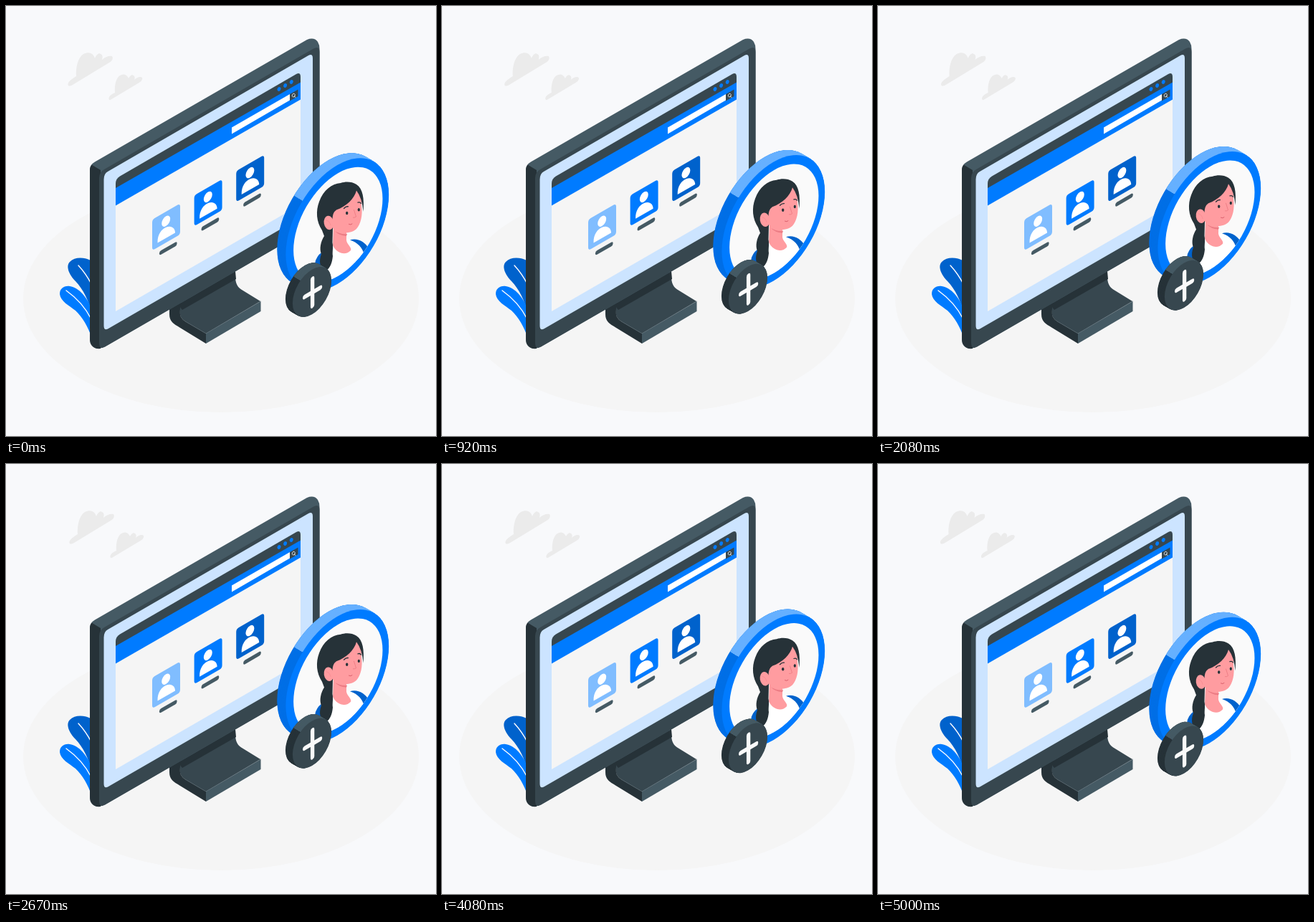
Animation of 600 by 600 pixels, one loop 5.08 s. Source, as an HTML page with a canvas:

```html
<!DOCTYPE html>
<html lang="en">
<head>
<meta charset="utf-8">
<title>Add a contact</title>
<style>
  html, body { margin: 0; width: 100%; height: 100%; overflow: hidden; background: #f8f9fb; }
  canvas { display: block; width: 600px; height: 600px; }
</style>
</head>
<body>
<canvas id="stage" width="600" height="600"></canvas>
<script>
const ctx = document.getElementById('stage').getContext('2d');

const BLUE = '#007bff', DEEP = '#0062cc', SKY = '#66b0ff', PALE = '#cce4ff';
const INK = '#263238', SLATE = '#37474f', STEEL = '#455a64';
const PAPER = '#f5f5f5', MILK = '#fafafa', SKIN = '#ff9ca0', BLUSH = '#ec7c84';

const LOOP = 5080, STEP = 1000 / 12, STEPS = 61;
const SWAY = [[0, 0], [920, .8], [1580, 1.4], [2670, 2], [3330, -3], [4080, 2], [5080, .4]];

function fill(d, color) {
  ctx.fillStyle = color;
  ctx.fill(new Path2D(d));
}

function stroke(d, color, width) {
  ctx.strokeStyle = color;
  ctx.lineWidth = width;
  ctx.lineCap = ctx.lineJoin = 'round';
  ctx.stroke(new Path2D(d));
}

function oval(x, y, rx, ry, color, turn = 0) {
  ctx.fillStyle = color;
  ctx.beginPath();
  ctx.ellipse(x, y, rx, ry, turn, 0, Math.PI * 2);
  ctx.fill();
}

function shifted(x, y, draw) {
  ctx.save();
  ctx.translate(x, y);
  draw();
  ctx.restore();
}

// Shapes lying in the isometric plane of the screen.
function isoPath(x, y, shape) {
  const path = new Path2D();
  path.addPath(shape, new DOMMatrix([.866, -.5, 0, 1, x, y]));
  return path;
}

function isoCircle(x, y, r) {
  const circle = new Path2D();
  circle.arc(0, 0, r, 0, Math.PI * 2);
  return isoPath(x, y, circle);
}

function isoRect(x, y, w, h, r, color) {
  const rect = new Path2D();
  rect.roundRect(-w / 2, -h / 2, w, h, r);
  ctx.fillStyle = color;
  ctx.fill(isoPath(x, y, rect));
}

// Thick disc: side wall, lit upper wall, then the front face.
function isoDisc(x, y, r, depth, split, side, lit, front) {
  const wall = color => {
    ctx.fillStyle = color;
    for (let d = depth; d > 0; d -= .5) ctx.fill(isoCircle(x - d * .866, y - d * .5, r));
  };
  wall(side);
  ctx.save();
  ctx.beginPath();
  const [sx, sy] = split;
  ctx.moveTo(sx - 9, sy - 5.2);
  ctx.lineTo(sx + 60, sy + 34.6);
  ctx.lineTo(600, sy + 34.6);
  ctx.lineTo(600, 100);
  ctx.lineTo(sx - 9, 100);
  ctx.clip();
  wall(lit);
  ctx.restore();
  ctx.fillStyle = front;
  ctx.fill(isoCircle(x, y, r));
}

function drawClouds() {
  fill('M86.5 110C86 106 90 103 98 98C97 87 100 72 108 67C116 63 122 66 124 73C126 68 130 65 132 67C135 68 135 71 134 75C138 71 144 69 148 70C150 73 148 77 144 79L93 110C89 112 87 112 86.5 110Z', '#ebebeb');
  fill('M143.5 130C143 126 147 123 152 121C151 110 154 99 160 96.5C166 94 169 97 171 101C173 97 176 95 178 97C180 98 180 101 179 103C183 99 188 98 190 100C191 103 188 106 184 108L149 129C146 131 144 132 143.5 130Z', '#ebebeb');
}

function drawPlant() {
  fill('M120 356C109 350 96 350 89 357C83 363 88 375 97 384C108 396 115 410 120 430Z', DEEP);
  stroke('M101 362Q112 374 119 388', '#fff', 1.4);
  fill('M120 464C114 446 107 435 97 425C88 418 76 412 75 402C75 394 81 390 89 391C102 393 113 406 120 424Z', BLUE);
  stroke('M84 397C98 407 111 421 119 437', '#fff', 1.4);
}

function drawStand() {
  fill('M243 414L320 366C319 384 321 391 329 396L355 412L279 457L250 440C242 435 241 428 243 414Z', SLATE);
  fill('M243 415L320 370L321 381L246 424Q242 421 243 415Z', INK);
  fill('M228 430V420L245 412C241 428 242 435 250 440L279 457V471L243 449C233 443 228 440 228 430Z', INK);
  fill('M279 457L355.5 412V426L279 471Z', STEEL);
  stroke('M250 440L279 457L355 412', '#52656e', .5);
}

function drawMonitor() {
  fill('M117 229Q117 221.5 124 217.5L420 47Q430 43 435 50Q437.5 54 437.5 60V302.5L138 475.5Q126 481 120 474Q117 471 117 464Z', STEEL);
  fill('M117 229Q117 224 119.5 221.5L132 229L132 478Q124 479 120 474Q117 471 117 464Z', INK);
  fill('M130 240Q130 232 137 228L429 59.5Q437.5 55 437.5 64V302.5L138 475.5Q130 480 130 470Z', SLATE);
  fill('M136.5 242Q136.5 234 142 231L422 69Q428 66 428 73V281Q428 285 422 289L143 450Q136.5 454 136.5 446Z', PALE);
}

function drawWindow() {
  fill('M153 250L411 102V277L153 426Z', PAPER);
  fill('M153 255V248Q153 241 159 237.5L405 95Q411 92 411 99V108Z', SLATE);
  fill('M153 254L411 106.5V130.5L153 278.5Z', BLUE);
  for (let i = 0; i < 3; i++) oval(381 + i * 8.6, 116 - i * 5, 2.3, 3, BLUE, .4);
  fill('M315 169.5L396 123V131.5L315 178.5Z', '#fff');
  fill('M396 123L407.5 116.5V126L396 132.5Z', SLATE);
  ctx.strokeStyle = '#fff';
  ctx.lineWidth = .8;
  ctx.beginPath();
  ctx.ellipse(401.3, 124.6, 1.9, 2.5, .4, 0, Math.PI * 2);
  ctx.stroke();
  stroke('M402.5 126.5L404 127.5', '#fff', .8);
}

function drawCard(color) {
  isoRect(223.5, 308.3, 45, 43.2, 4, color);
  ctx.fillStyle = '#fff';
  ctx.fill(isoCircle(223.2, 300.2, 6.9));
  fill('M211.5 330.5C211 319 217 311 224 308.5C231 306 236 310 236 316.5Z', '#fff');
  isoRect(226.3, 338.2, 28.5, 5.8, 2.9, STEEL);
}

function drawWoman() {
  // clothes
  fill('M428 375L432 355Q436 345 444 342L447 375Z', DEEP);
  fill('M446 330L458 320L481 326C491 323 501 329 506 338L500 400H440Z', '#fff');
  fill('M480 326.5C490 323 501 329 506 338L500 347C497 337 491 330 480 326.5Z', DEEP);
  // neck and face
  fill('M457 306L456 334C461 345 474 349 481 341C483 337 476 333 475 327V314Z', SKIN);
  fill('M459 314Q467 319 476 318L475 321Q464 320 459 314Z', BLUSH);
  fill('M455 290L486 254C494 260 497 270 496 279C498 292 495 304 489 311C483 317 470 318 461 315L452 306Z', SKIN);
  // hair
  fill('M441 313C433 301 432 286 437 273C443 257 454 248 467 247C474 244.5 483 245 489 249C498 255 500 268 498.5 287Q497 268 489 257.5C486 269 475 279.5 461 284.5C456 288 456 293 455.5 297L456 310L455.5 330C457 338 455 343 456 349C455 358 453 365 446 370C438 366 436 357 440 346C437 339 439 329 444 321Z', INK);
  oval(450.5, 302.5, 6.8, 9.8, SKIN, -.15);
  stroke('M447 299Q452 300 453 306', '#f58c92', .8);
  // features
  oval(475.7, 289, 1.7, 2.2, INK);
  oval(492.3, 284.2, 1.6, 2.2, INK);
  stroke('M471.5 282.5Q474 279.5 477.5 279.8', INK, 1.3);
  stroke('M491 274.2Q494 273 495.3 275.5', INK, 1.3);
  stroke('M485.5 284.5L488.5 294Q487 295.5 484.5 295.2', BLUSH, .9);
  stroke('M478.5 304.5Q481 306 483 304', '#d95f6b', 1);
}

function drawBadge() {
  isoDisc(462.3, 305, 83, 14, [403, 265], '#006fe6', SKY, BLUE);
  const face = isoCircle(463.3, 305, 71.8);
  ctx.fillStyle = MILK;
  ctx.fill(face);
  ctx.save();
  ctx.clip(face);
  drawWoman();
  ctx.restore();
  isoDisc(427, 399, 31.3, 11.5, [400, 376.5], INK, STEEL, SLATE);
  isoRect(427.6, 399.5, 6.2, 44, 3.1, MILK);
  isoRect(427.6, 399.5, 31.5, 6.2, 3.1, MILK);
}

function swayAt(t) {
  const i = SWAY.findIndex(key => key[0] > t);
  const [t0, x0] = SWAY[i - 1], [t1, x1] = SWAY[i];
  return x0 + (x1 - x0) * (t - t0) / (t1 - t0);
}

function floatAt(t) {
  return .00463 * (Math.abs(t - 2335) - 2335);
}

function render(now) {
  const step = Math.floor((now % LOOP) / LOOP * STEPS + .01) % STEPS;
  const t = step * STEP;
  ctx.fillStyle = '#f8f9fb';
  ctx.fillRect(0, 0, 600, 600);
  oval(300, 408, 276, 159, PAPER);
  shifted(swayAt(t), 0, drawClouds);
  drawPlant();
  drawStand();
  drawMonitor();
  drawWindow();
  ['#80bdff', BLUE, DEEP].forEach((color, i) =>
    shifted(i * 58.6, i * -33.8, () => drawCard(color)));
  shifted(0, floatAt(t), drawBadge);
}

function tick() {
  render(performance.now());
  requestAnimationFrame(tick);
}
tick();
</script>
</body>
</html>
```
